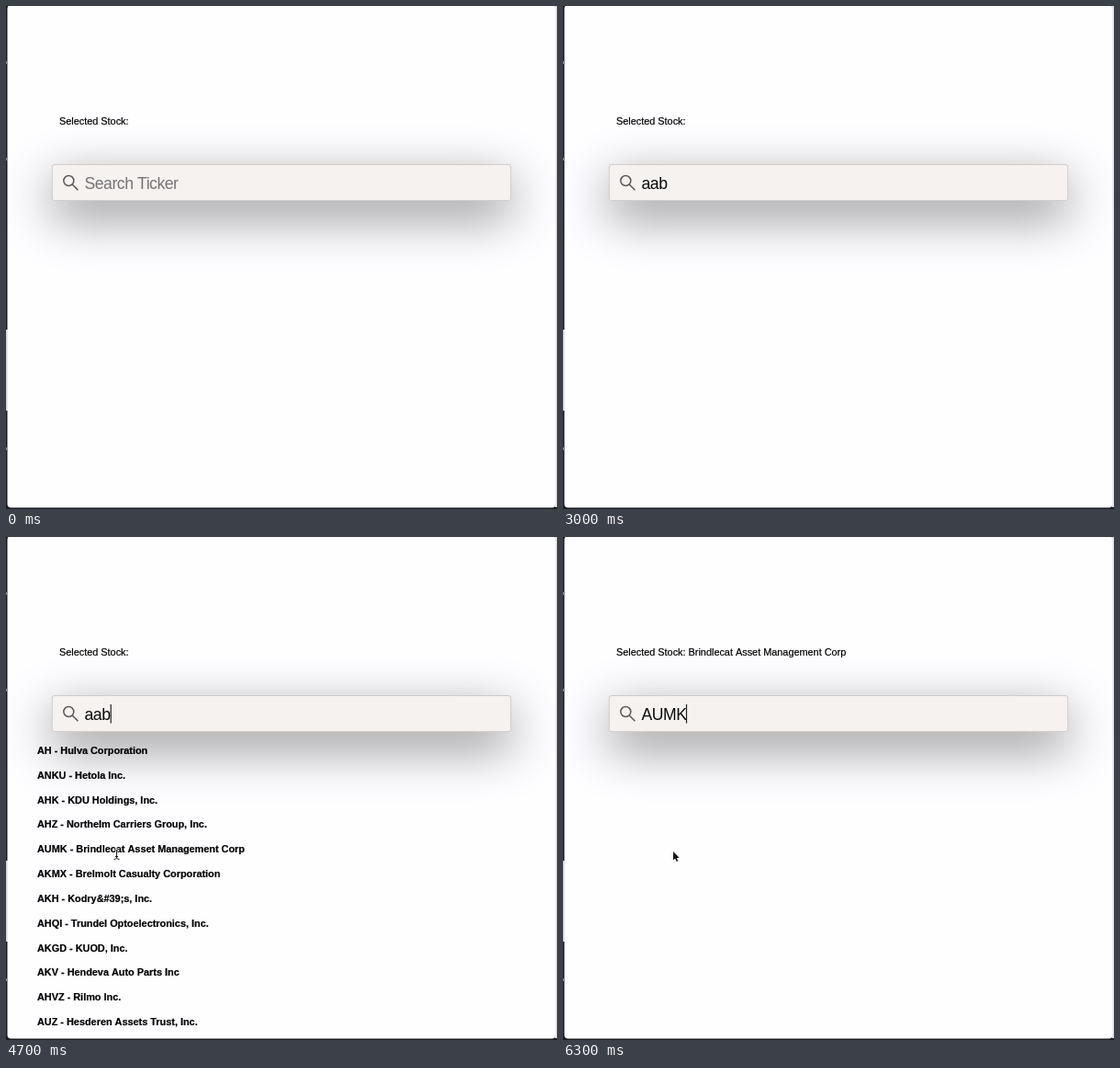
These frames come from a looping animation (600x547 px, 6600 ms). An HTML page with a canvas:

```html
<!DOCTYPE html>
<html lang="en">
<head>
<meta charset="utf-8">
<title>Ticker search</title>
<style>
  html, body { margin: 0; width: 100%; height: 100%; overflow: hidden; background: #fefdff; }
  canvas { display: block; }
</style>
</head>
<body>
<canvas id="stage" width="600" height="547"></canvas>
<script>
const ctx = document.getElementById('stage').getContext('2d');
const LOOP = 6600, STEP = 100;
const SANS = '"Liberation Sans", Arial, sans-serif';

const PICK = 'Brindlecat Asset Management Corp';
const STOCKS = [
  'AH - Hulva Corporation',
  'ANKU - Hetola Inc.',
  'AHK - KDU Holdings, Inc.',
  'AHZ - Northelm Carriers Group, Inc.',
  'AUMK - ' + PICK,
  'AKMX - Brelmolt Casualty Corporation',
  'AKH - Kodry&#39;s, Inc.',
  'AHQI - Trundel Optoelectronics, Inc.',
  'AKGD - KUOD, Inc.',
  'AKV - Hendeva Auto Parts Inc',
  'AHVZ - Rilmo Inc.',
  'AUZ - Hesderen Assets Trust, Inc.'
];

// start time, field value, caret x
const VALUES = [
  [0, '', 86.5], [2200, 'a', 95.3], [2400, 'aa', 104.5],
  [2500, 'aab', 114.2], [4900, 'AUMK', 134.5]
];

// spans in which the caret shows
const CARET = [
  [200, 700], [1200, 1700], [2200, 3000], [3500, 4000],
  [4500, 4900], [5300, 5800], [6300, 6600]
];

// time, x, y, shape
const POINTER = [
  [0, 0, 0, ''], [100, 150, 463, 'arrow'], [200, 183, 193, 'beam'],
  [300, 180, 187, 'beam'], [400, 175, 182, 'beam'], [2200, 0, 0, ''],
  [3800, 167, 195, 'beam'], [3900, 145, 250, 'beam'], [4000, 102, 318, 'beam'],
  [4100, 62, 368, 'beam'], [4200, 42, 386, 'beam'], [4300, 75, 373, 'beam'],
  [4400, 105, 359, 'beam'], [4500, 116, 354, 'beam'], [4600, 121, 348, 'beam'],
  [4700, 120, 345, 'beam'], [5000, 120, 341, 'arrow'], [6000, 120, 342, 'arrow']
];

const latest = (rows, t) => rows.filter(row => row[0] <= t).pop();

function text(str, x, y, font, color, spacing = 0) {
  ctx.font = font;
  ctx.letterSpacing = spacing + 'px';
  ctx.fillStyle = color;
  ctx.fillText(str, x, y);
}

// small page text, slightly thickened
function label(str, x, y, weight) {
  text(str, x, y, weight + ' 10.88px ' + SANS, '#000');
  ctx.strokeStyle = '#000';
  ctx.lineWidth = 0.2;
  ctx.strokeText(str, x, y);
}

function rect(x, y, w, h, color) {
  ctx.fillStyle = color;
  ctx.fillRect(x, y, w, h);
}

function roundRect(x, y, w, h, r) {
  ctx.beginPath();
  ctx.roundRect(x, y, w, h, r);
}

function drawWindow() {
  rect(0, 0, 600, 547, '#1b1a1f');
  rect(0, 352, 2, 88, '#d5d4d8');
  for (const y of [60, 165, 480]) rect(0, y, 1, 3, '#8c8b90');
  rect(598, 0, 2, 545, '#dedde0');
  ctx.fillStyle = '#fefdff';
  roundRect(1.5, -1, 597, 546.5, 4);
  ctx.fill();
}

function drawField() {
  ctx.save();
  ctx.shadowColor = 'rgba(0,0,0,0.46)';
  ctx.shadowBlur = 54;
  ctx.shadowOffsetY = 17;
  ctx.fillStyle = '#f5f2f0';
  roundRect(50, 172, 500, 40, 3);
  ctx.fill();
  ctx.restore();

  ctx.strokeStyle = '#cfccc9';
  ctx.lineWidth = 1;
  roundRect(50.3, 172.5, 499.4, 39, 2.5);
  ctx.stroke();

  ctx.strokeStyle = '#5a5859';
  ctx.lineWidth = 1.5;
  ctx.beginPath();
  ctx.arc(68.3, 190, 5.5, 0, Math.PI * 2);
  ctx.moveTo(72.2, 193.9);
  ctx.lineTo(78.4, 200.3);
  ctx.stroke();
}

function drawValue(t) {
  const [, value, x] = latest(VALUES, t);
  text(value || 'Search Ticker', 85.5, 199, '17.6px ' + SANS, value ? '#0c0c0c' : '#757374', -0.45);
  if (CARET.some(([from, to]) => t >= from && t < to)) rect(x - 0.6, 182, 1.2, 20.5, '#222');
}

function listAlpha(t) {
  if (t < 3400) return 0;
  return t < 4900 ? 1 : Math.max(0, 1 - (t - 4800) / 500);
}

function drawList(t) {
  ctx.globalAlpha = listAlpha(t);
  STOCKS.forEach((name, i) => label(name, 34, 236 + i * 26.82, 'bold'));
  ctx.globalAlpha = 1;
}

function drawArrow() {
  ctx.beginPath();
  [[0, 0], [0, 9.4], [2.1, 7.4], [3.7, 11], [5.2, 10.3], [3.7, 6.9], [6.6, 6.8]]
    .forEach(([x, y]) => ctx.lineTo(x, y));
  ctx.closePath();
  ctx.strokeStyle = '#fff';
  ctx.lineWidth = 1.2;
  ctx.stroke();
  ctx.fillStyle = '#111';
  ctx.fill();
}

function drawBeam() {
  ctx.beginPath();
  for (const s of [-1, 1]) {
    ctx.moveTo(-2.5, 5.5 * s);
    ctx.quadraticCurveTo(0, 5.5 * s, 0.5, 4 * s);
    ctx.quadraticCurveTo(1, 5.5 * s, 3.5, 5.5 * s);
  }
  ctx.moveTo(0.5, -4);
  ctx.lineTo(0.5, 4);
  ctx.moveTo(-1, 2.5);
  ctx.lineTo(2, 2.5);
  for (const [color, width] of [['rgba(255,255,255,0.8)', 2.4], ['#1c1c1c', 1]]) {
    ctx.strokeStyle = color;
    ctx.lineWidth = width;
    ctx.stroke();
  }
}

function drawPointer(t) {
  const [, x, y, shape] = latest(POINTER, t);
  if (!shape) return;
  ctx.save();
  ctx.translate(x, y);
  shape === 'arrow' ? drawArrow() : drawBeam();
  ctx.restore();
}

function render(t) {
  drawWindow();
  drawField();
  label('Selected Stock: ' + (t >= 4900 ? PICK : ''), 58, 129, 'normal');
  drawValue(t);
  drawList(t);
  drawPointer(t);
}

const start = performance.now();
function tick() {
  const t = (performance.now() - start) % LOOP;
  render(Math.floor(t / STEP) * STEP);
  requestAnimationFrame(tick);
}
tick();
</script>
</body>
</html>
```
